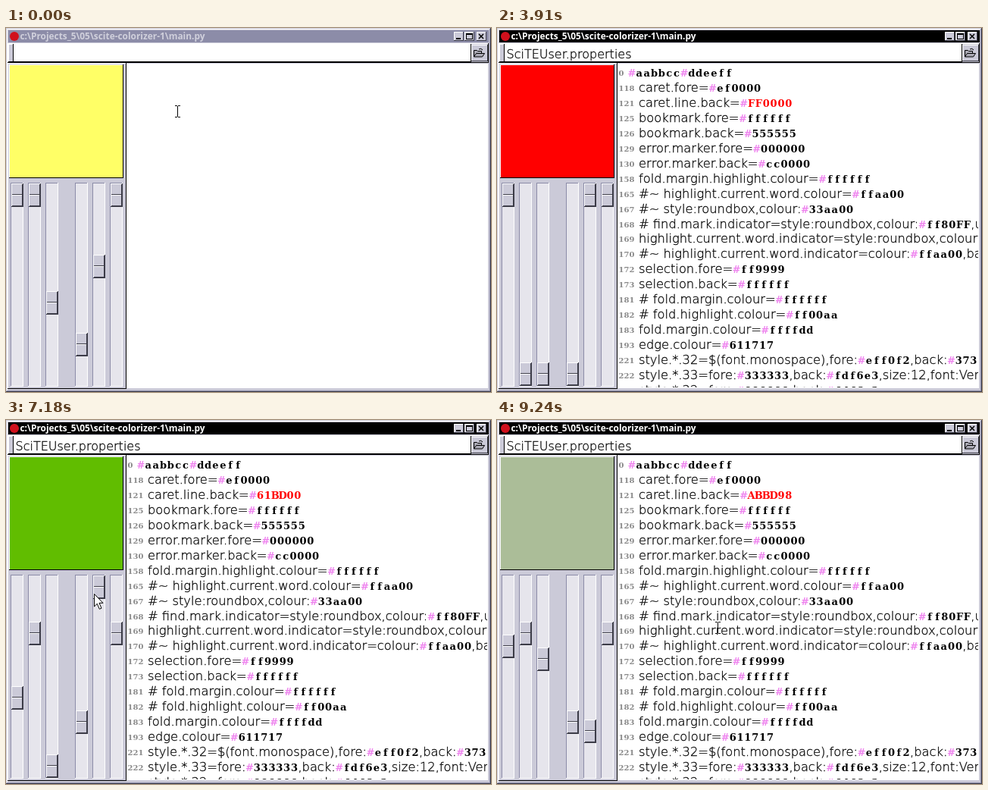
Recreate the animation shown at these times as an HTML page. Size 640 by 480 pixels, loop 9.61 s.

```html
<!DOCTYPE html>
<html lang="en">
<head>
<meta charset="utf-8">
<title>Colorizer</title>
<style>
  html, body { margin: 0; width: 100%; height: 100%; overflow: hidden; background: #cbcad8; }
  svg { display: block; width: 640px; height: 480px; }
  rect, .crisp { shape-rendering: crispEdges; }
  text { white-space: pre; }
  .title { font: bold 11.9px "Open Sans", "Noto Sans", sans-serif; }
  .plain { font: 200 16.3px "DejaVu Sans", sans-serif; stroke: #000; stroke-width: .3px; }
  .entry { font-size: 16px; }
  .hex { font: bold 13px "DejaVu Serif", serif; text-anchor: middle; }
  .num { font: bold 10px "DejaVu Serif", serif; fill: #8a8a8a; }
</style>
</head>
<body>
<svg id="stage" viewBox="0 0 640 480" xmlns="http://www.w3.org/2000/svg"></svg>
<script>
const LOOP = 9610, TICK = 1000 / 11;
const FACE = '#cbcad8', TROUGH = '#e6e5ec', SHADE = '#8c8ca8', DARK = '#3c3c48';
const stage = document.getElementById('stage');

function add(parent, tag, attrs, text) {
  const el = document.createElementNS('http://www.w3.org/2000/svg', tag);
  for (const key in attrs) el.setAttribute(key, attrs[key]);
  if (text !== undefined) el.textContent = text;
  parent.appendChild(el);
  return el;
}
const box = (parent, x, y, width, height, fill) => add(parent, 'rect', { x, y, width, height, fill });
const show = (el, on) => el.setAttribute('visibility', on ? 'visible' : 'hidden');

// Two-tone edge: light is top and left, dark is bottom and right
function bevel(parent, x, y, w, h, light, dark, fill) {
  box(parent, x, y, w, h, dark);
  box(parent, x, y, w - 1, h - 1, light);
  return box(parent, x + 1, y + 1, w - 2, h - 2, fill);
}

// Window frame and title bar
bevel(stage, 0, 0, 640, 480, FACE, DARK, FACE);
bevel(stage, 1, 1, 638, 478, '#fff', SHADE, FACE);
const titleBar = box(stage, 3, 3, 634, 16, SHADE);
add(stage, 'circle', { cx: 11, cy: 11, r: 6, fill: '#d0101c' });
const titleText = add(stage, 'text', { x: 18.5, y: 15, class: 'title' }, 'c:\\Projects_5\\05\\scite-colorizer-1\\main.py');
for (const x of [591, 605, 621]) bevel(stage, x, 5, 13, 12, '#fff', DARK, FACE);
box(stage, 594, 13, 6, 2, '#000');
box(stage, 607, 7, 9, 8, '#000');
box(stage, 608, 9, 7, 5, FACE);
add(stage, 'path', { d: 'M624 8l6 6M630 8l-6 6', stroke: '#000', 'stroke-width': 1.6 });

// File entry and browse button
bevel(stage, 2, 20, 635, 26, '#fff', '#000', FACE);
bevel(stage, 3, 21, 7, 24, '#fff', '#000', FACE);
bevel(stage, 10, 21, 604, 24, '#fff', '#000', '#fff');
const button = bevel(stage, 614, 22, 22, 22, '#fff', DARK, FACE);
add(stage, 'path', {
  d: 'M617.5 38V29.500h4l1 1h5v3M617.500 38l3-4.500h11l-3 4.500zM624 28q3-2 5 1',
  fill: '#aaa9b4', stroke: '#000', 'stroke-width': 1
});
const entry = add(stage, 'text', { x: 12.5, y: 39.5, class: 'plain entry' }, 'SciTEUser.properties');
const caret = box(stage, 12, 25, 1, 17, '#000');

// Colour panel
bevel(stage, 2, 46, 157, 430, '#fff', '#000', FACE);
const swatch = bevel(stage, 4, 48, 151, 150, '#fff', '#000', '#ff6');

const sliders = [6, 29, 52, 91, 114, 137].map(x => {
  bevel(stage, x, 204, 17, 269, SHADE, '#fff', TROUGH);
  const g = add(stage, 'g', {});
  const raised = add(g, 'g', {}), sunken = add(g, 'g', {});
  bevel(raised, 0, 0, 16, 31, '#fff', DARK, DARK);
  box(raised, 1, 1, 13, 28, FACE);
  bevel(sunken, 0, 0, 16, 31, SHADE, '#fff', '#c2c1d2');
  for (const [part, upper, lower] of [[raised, DARK, '#fff'], [sunken, '#eeeef4', SHADE]]) {
    box(part, 1, 14, 13, 1, upper);
    box(part, 1, 15, 13, 1, lower);
  }
  return { g, raised, sunken, x: x + 1 };
});

// Text pane
box(stage, 159, 47, 477, 428, '#fff');
const clip = add(add(stage, 'defs', {}), 'clipPath', { id: 'pane' });
box(clip, 159, 47, 476, 427, '#000');
const pane = add(stage, 'g', { 'clip-path': 'url(#pane)' });

const LINES = `0 #aabbcc#ddeeff
118 caret.fore=#ef0000
121 caret.line.back=#ff0000
125 bookmark.fore=#ffffff
126 bookmark.back=#555555
129 error.marker.fore=#000000
130 error.marker.back=#cc0000
158 fold.margin.highlight.colour=#ffffff
165 #~ highlight.current.word.colour=#ffaa00
167 #~ style:roundbox,colour:#33aa00
168 # find.mark.indicator=style:roundbox,colour:#ff80FF,under
169 highlight.current.word.indicator=style:roundbox,colour:#ffaa00
170 #~ highlight.current.word.indicator=colour:#ffaa00,back
172 selection.fore=#ff9999
173 selection.back=#ffffff
181 # fold.margin.colour=#ffffff
182 # fold.highlight.colour=#ff00aa
183 fold.margin.colour=#ffffdd
193 edge.colour=#611717
221 style.*.32=$(font.monospace),fore:#eff0f2,back:#373737
222 style.*.33=fore:#333333,back:#fdf6e3,size:12,font:Verdana
223 style.*.32=fore:#000000,back:#fdf6e3`.split('\n');
const PITCH = 9.85;

function hexToken(x, y, digits) {
  add(pane, 'text', { x: x + PITCH / 2, y, class: 'hex', fill: '#ee82ee' }, '#');
  const xs = [...digits].map((d, i) => x + PITCH * (i + 1.5)).join(' ');
  return add(pane, 'text', { x: xs, y, class: 'hex' }, digits);
}

let picked;
LINES.forEach((line, row) => {
  const gap = line.indexOf(' '), y = 64 + row * 19.95;
  const num = line.slice(0, gap);
  add(pane, 'text', { x: 160.5, y: y - 1, class: 'num' }, num);
  let x = 166 + 7 * num.length;
  for (const part of line.slice(gap + 1).split(/(#[0-9a-f]{6})/i)) {
    if (!part) continue;
    if (/^#[0-9a-f]{6}$/i.test(part)) {
      const digits = hexToken(x, y, part.slice(1));
      if (num === '121') picked = digits;
      x += PITCH * 7;
    } else {
      x += add(pane, 'text', { x, y, class: 'plain' }, part).getComputedTextLength();
    }
  }
});

// Pointers
const beam = add(stage, 'path', {
  class: 'crisp', fill: 'none', stroke: '#000',
  d: 'M-3 -7.500h3M1 -7.500h3M.5 -7V7M-3 7.500h3M1 7.500h3'
});
const arrow = add(stage, 'path', {
  d: 'M.5 .5V17L4.300 13.300L7.300 20.300L10 19.200L7 12.300H12Z',
  fill: '#fff', stroke: '#000', 'stroke-width': 1
});

// All times below are in ticks of the screen's 11 updates per second
const HOME = [226, 110];
const MOVES = [
  { from: 3, to: 7, at: [203, 37] },
  { from: 15, to: 17, at: [208, 36] },
  { from: 18, to: 21, at: [622, 33] },
  { from: 23, to: 28, at: [273, 85] },
  { from: 28, to: 33, at: [342, 97] },
  { from: 40, to: 42, at: [102, 193] },
  { from: 42, to: 43, at: [-60, 200] },
  { from: 43, to: 45, at: [0, 219] },
  { from: 45, to: 49, at: [20, 219] },
  { from: 50, to: 53, at: [23, 341] },
  { from: 53, to: 55, at: [23, 365] },
  { from: 57, to: 63, at: [54, 451] },
  { from: 65, to: 68, at: [54, 301] },
  { from: 68, to: 70, at: [54, 276] },
  { from: 71, to: 79, at: [116, 229] },
  { from: 80, to: 84, at: [116, 385] },
  { from: 84, to: 91, at: [116, 426] },
  { from: 91, to: 102, at: [291, 274] }
];
// Grip is the distance from the thumb's top to the pointer
const RED = { slider: 0, from: 51, to: 58, grip: 14 };
const GREEN = { slider: 1, from: 66, to: 72, grip: 10 };
const SATURATION = { slider: 4, from: 81, to: 92, grip: 31 };
const PICK = 35, THUMB_TOP = 205, TRAVEL = 236;

function pointerAt(tick) {
  return MOVES.reduce((pos, { from, to, at }) => {
    const u = Math.min(1, Math.max(0, (tick - from) / (to - from)));
    return pos.map((p, i) => p + (at[i] - p) * u);
  }, HOME);
}

// Slider level from 0 to 1; it stays where the drag left it
function dragged(drag, tick, before) {
  if (tick < drag.from) return before;
  const y = pointerAt(Math.min(tick, drag.to - 1))[1] - drag.grip;
  return Math.min(1, Math.max(0, 1 - (y - THUMB_TOP) / TRAVEL));
}

function colorAt(tick) {
  if (tick < PICK) return [1, 1, 0.4];
  const pure = [dragged(RED, tick, 1), dragged(GREEN, tick, 0), 0];
  const max = Math.max(...pure), s = dragged(SATURATION, tick, 1);
  return pure.map(c => max - (max - c) * s);
}

function toHsv([r, g, b]) {
  const max = Math.max(r, g, b), d = max - Math.min(r, g, b);
  const sector = max === r ? (g - b) / d : max === g ? 2 + (b - r) / d : 4 + (r - g) / d;
  return [d ? (sector + 6) % 6 / 6 : 0, max ? d / max : 0, max];
}
const hex = rgb => rgb.map(c => Math.floor(c * 255).toString(16).padStart(2, '0')).join('').toUpperCase();

function draw(time) {
  const tick = Math.floor(time / TICK + 0.4);
  const within = (a, b) => tick >= a && tick < b;

  const active = tick >= 9;
  titleBar.setAttribute('fill', active ? '#000' : SHADE);
  titleText.setAttribute('fill', active ? '#fff' : '#d0d0dc');
  show(entry, tick >= 14);
  show(caret, within(9, 17) || within(29, PICK));
  caret.setAttribute('x', tick < 14 ? 12 : 181);
  button.setAttribute('fill', within(22, 23) ? '#b4b3c4' : FACE);
  show(pane, tick >= 23);

  const rgb = colorAt(tick);
  swatch.setAttribute('fill', '#' + hex(rgb));
  picked.textContent = tick < PICK ? 'ff0000' : hex(rgb);
  picked.setAttribute('fill', tick < PICK ? '#000' : '#f00');

  const levels = [...rgb, ...toHsv(rgb)];
  sliders.forEach(({ g, raised, sunken, x }, i) => {
    const y = Math.round(THUMB_TOP + TRAVEL * (1 - levels[i]));
    const pressed = [RED, GREEN, SATURATION].some(d => d.slider === i && within(d.from, d.to));
    g.setAttribute('transform', `translate(${x} ${y})`);
    show(raised, !pressed);
    show(sunken, pressed);
  });

  const [x, y] = pointerAt(tick).map(Math.round);
  const overText = x > 158 && !(x > 613 && y < 46);
  show(beam, overText);
  show(arrow, !overText);
  (overText ? beam : arrow).setAttribute('transform', `translate(${x} ${y})`);
}

const start = performance.now();
function frame(now) {
  draw(Math.max(0, now - start) % LOOP);
  requestAnimationFrame(frame);
}
draw(0);
requestAnimationFrame(frame);
</script>
</body>
</html>
```
